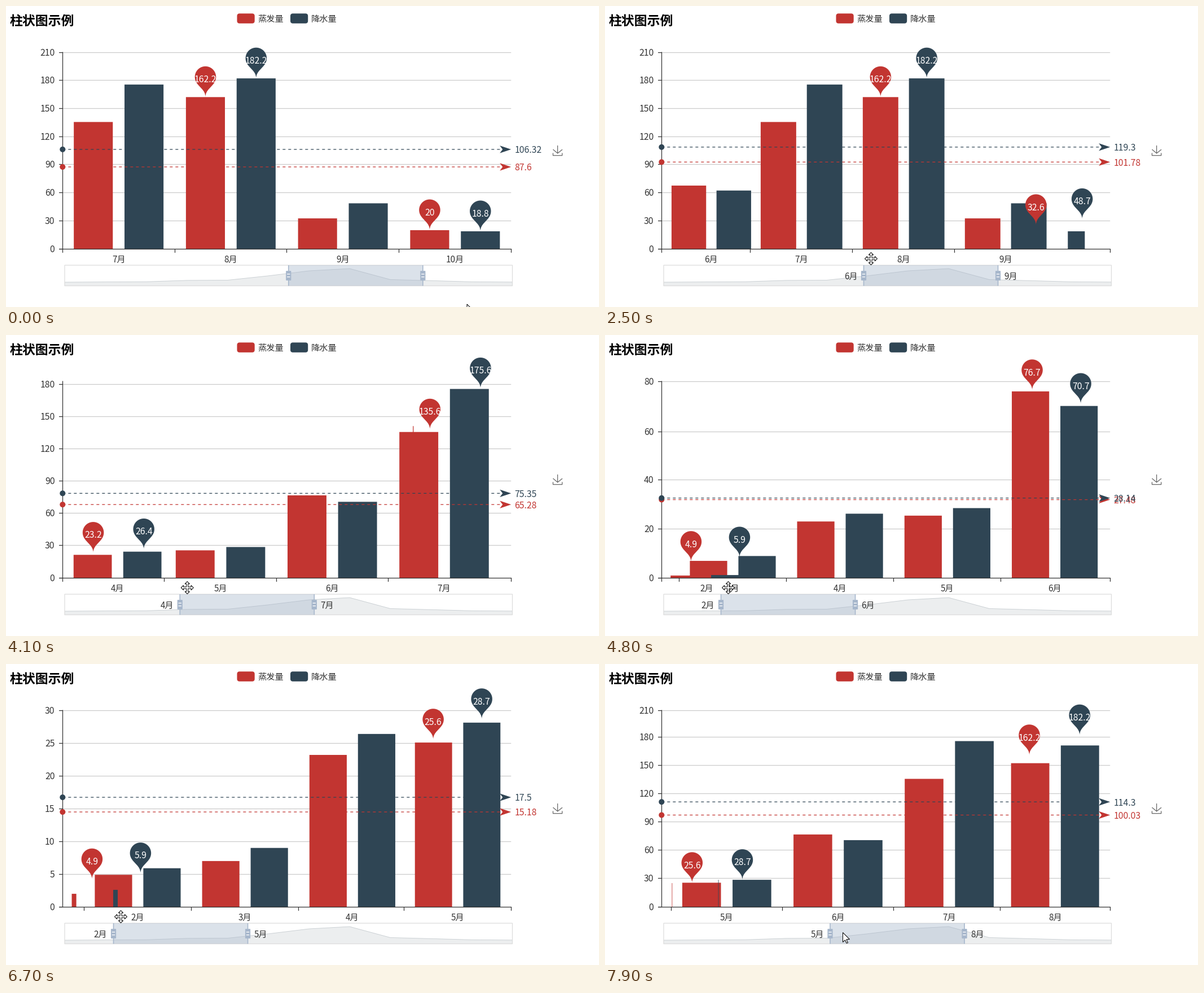
Write a matplotlib script that moves like this. It is 1051 px wide and 533 px high and loops after 8 s.

```python
import numpy as np
import matplotlib.pyplot as plt
from matplotlib.animation import FuncAnimation
from matplotlib.patches import Circle, FancyBboxPatch, PathPatch, Polygon, Rectangle
from matplotlib.path import Path

W, H, DPI = 1051, 533, 64
STEP, FRAMES = 100, 80
PT = 72 / DPI
RED, NAVY, INK, HANDLE = "#c23531", "#2f4554", "#333333", "#a7b7cc"
COLORS = (RED, NAVY)

EVAPORATION = [2, 4.9, 7, 23.2, 25.6, 76.7, 135.6, 162.2, 32.6, 20, 6.4, 3.3]
RAINFALL = [2.6, 5.9, 9, 26.4, 28.7, 70.7, 175.6, 182.2, 48.7, 18.8, 6, 2.3]
DATA = np.array([EVAPORATION, RAINFALL])

# Plot area and zoom slider
X0, X1, TOP, BASE = 100.3, 895.2, 82.1, 430.1
S0, S1, S_TOP, S_BOTTOM = 104, 897.5, 459, 495.5
SPAN = 0.3
WINDOW = SPAN * (S1 - S0)

MOVE_MS, EXIT_MS = 300, 185
LAG = 65  # the chart follows the slider this much later
HOVER, ON_HANDLE, DRAG, RELEASE = 500, 1300, 2000, 7800

# (time, left edge) where the drag changes speed
DRAG_KEYS = [(2260, 500.75), (2500, 458.5), (3860, 358), (3875, 334),
             (4500, 262.5), (4710, 212.5), (5645, 140), (5900, 111.5),
             (6240, 104), (6519, 140), (6700, 190.5), (7618, 334),
             (7672, 357), (7900, 399)]

# (time, x, y) of the pointer on its way to the slider
APPROACH = [(0, 817, 528), (300, 617, 487), (400, 617, 487),
            (1300, 505, 476.5), (1500, 509, 476.5), (1900, 509, 476.5)]

plt.rcParams["path.snap"] = False
plt.rcParams["font.family"] = ["Noto Sans CJK JP", "DejaVu Sans"]

fig = plt.figure(figsize=(W / DPI, H / DPI), dpi=DPI, facecolor="white")
ax = fig.add_axes([0, 0, 1, 1])
ax.set_xlim(0, W)
ax.set_ylim(H, 0)
ax.axis("off")


# ---------- motion ----------

def along(keys, t):
    """Position at time t on a path of (time, *position) points."""
    times, *tracks = zip(*keys)
    return [np.interp(t, times, track) for track in tracks]


def slider_left(t):
    return along(DRAG_KEYS, t)[0]


def view_at(t):
    """First and last month that the zoom window covers."""
    start = (slider_left(t) - S0) / (S1 - S0)
    return tuple(int(np.floor(p * 11 + 0.5 + 1e-9)) for p in (start, start + SPAN))


def month(i):
    return f"{i + 1}月"


def y_ticks(first, last):
    peak = DATA[:, first:last + 1].max()
    step = 30 if peak > 100 else 20 if peak > 50 else 5
    return np.arange(0, np.ceil(peak / step) + 1) * step


def extremes(s, first, last):
    part = DATA[s, first:last + 1]
    return first + int(part.argmax()), first + int(part.argmin())


def layout(first, last):
    """Resting place of every moving part."""
    ticks = y_ticks(first, last)
    unit = (BASE - TOP) / ticks[-1]
    band = (X1 - X0) / (last - first + 1)
    bar = band * 0.8 / 2.3
    place = {("y", v): [BASE - v * unit] for v in ticks}
    for i in range(first, last + 1):
        left = X0 + (i - first) * band
        place["tick", i] = [left]
        place["month", i] = [left + band / 2]
        for s in (0, 1):
            x = left + band * 0.1 + s * bar * 1.3
            place["bar", s, i] = [x, bar, DATA[s, i] * unit]
    for s in (0, 1):
        for n, i in enumerate(extremes(s, first, last)):
            x, width, height = place["bar", s, i]
            place["pin", s, n] = [x + width / 2, BASE - height]
        place["mean", s] = [BASE - DATA[s, first:last + 1].mean() * unit]
    return {k: np.array(v, float) for k, v in place.items()}


def blend(start, end, ms):
    p = 1 - (1 - min(ms / MOVE_MS, 1)) ** 3
    return {k: start[k] + (end[k] - start[k]) * p for k in end}


def entry(key, goal):
    return goal * [1, 1, 0] if key[0] == "bar" else goal


def build_stages():
    """Each new view starts from wherever the previous one had got to."""
    view = view_at(0)
    start = end = layout(*view)
    stages = [(0, view, start, end, {})]
    for t in range(FRAMES * STEP):
        new = view_at(t - LAG)
        if new == view:
            continue
        now, goal = blend(start, end, t - stages[-1][0]), layout(*new)
        gone = {k: v for k, v in now.items() if k[0] == "bar" and k not in goal}
        start = {k: now.get(k, entry(k, g)) for k, g in goal.items()}
        view, end = new, goal
        stages.append((t, view, start, end, gone))
    return stages


STAGES = build_stages()


# ---------- drawing helpers ----------

def crisp(v):
    return np.floor(v) + 0.5


def line(points, color=INK, lw=1.25, z=2, **kw):
    xs, ys = zip(*points)
    return ax.plot(xs, ys, color=color, lw=lw * PT, zorder=z,
                   solid_capstyle="butt", dash_capstyle="butt", **kw)[0]


def poly(points, color, z, **kw):
    return ax.add_patch(Polygon(points, facecolor=color, zorder=z, **kw))


def box(x, y, w, h, color, z, **kw):
    return ax.add_patch(Rectangle((x, y), w, h, facecolor=color, zorder=z, **kw))


def round_box(x, y, w, h, r, color, z):
    style = f"round,pad=0,rounding_size={r}"
    return ax.add_patch(FancyBboxPatch((x, y), w, h, boxstyle=style,
                                       facecolor=color, lw=0, zorder=z))


def text(x, y, s, color=INK, ha="center", size=15.2, z=8, **kw):
    return ax.text(x, y + size * 0.37, s, color=color, ha=ha, va="baseline",
                   fontsize=size * PT, zorder=z, **kw)


def number(x, y, value, color=INK, ha="center", z=8):
    return text(x, y, f"{float(f'{value:.2f}'):g}", color, ha, 15.8, z)


def pin_path(size=62.5):
    r = size * 0.3
    dy = r * r / (size - r)
    cy = r + dy - size
    a = np.arcsin(dy / r)
    dx = r * np.cos(a)
    arc = np.linspace(np.pi - a, 2 * np.pi + a, 60)
    points = [(r * np.cos(u), cy + r * np.sin(u)) for u in arc]
    bend_x, bend_y = dx - np.sin(a) * r * 0.6, cy + dy + np.cos(a) * r * 0.6
    neck = (0, -r * 0.7)
    points += [(bend_x, bend_y), neck, (0, 0), neck, (-bend_x, bend_y), (-dx, cy + dy)]
    codes = [Path.MOVETO] + [Path.LINETO] * 59 + [Path.CURVE4] * 6
    return np.array(points), codes


PIN, PIN_CODES = pin_path()


def draw_pin(x, y, value, color, z):
    shape = Path(PIN + [x, y], PIN_CODES)
    return [ax.add_patch(PathPatch(shape, facecolor=color, lw=0, zorder=z)),
            number(x, y - 32, value, "white", z=z + 0.1)]


def draw_mean(y, value, color, z):
    tip = X1
    arrow = [(tip, y), (tip - 20, y - 6.67), (tip - 15, y), (tip - 20, y + 6.67)]
    return [line([(X0, y), (tip - 15, y)], color, z=z, dashes=(4, 4)),
            ax.add_patch(Circle((X0, y), 5, facecolor=color, lw=0, zorder=z)),
            poly(arrow, color, z, lw=0),
            number(901.5, y + 0.5, value, color, "left", z)]


def draw_handle(x):
    parts = [line([(x, S_TOP), (x, S_BOTTOM)], HANDLE, 1.6, z=7),
             round_box(x - 4.6, 469, 9.2, 17, 1, HANDLE, 7.1)]
    for y in (474.7, 479.7):
        parts.append(line([(x - 2.7, y), (x + 2.7, y)], "white", 1.3, z=7.2))
    return parts


ARROW = np.array([(0, 0), (0, 17), (4, 13.3), (6.7, 19), (9, 18), (6.4, 12.2), (12, 12)])
ARM = np.array([(-1.5, -1.5), (-1.5, -6.8), (-4.2, -6.8), (0, -11),
                (4.2, -6.8), (1.5, -6.8)])


def arms(*quarters):
    """Arrow heads pointing up, right, down or left (0 to 3)."""
    turns = [np.round([np.cos(q * np.pi / 2), np.sin(q * np.pi / 2)]) for q in quarters]
    return np.vstack([ARM @ [[c, s], [-s, c]] for c, s in turns])


CROSS, SIDEWAYS = arms(0, 1, 2, 3), arms(1, 3)


def draw_cursor(t):
    x, y = along(APPROACH, t) if t < DRAG else (slider_left(t) + 22.5, 475.5)
    if t < HOVER or t >= RELEASE:
        shape = ARROW
    else:
        shape = (SIDEWAYS if ON_HANDLE <= t < DRAG else CROSS) - [9.5, 28]
    return [poly(shape + [x, y], "white", 20, edgecolor="black", lw=PT)]


# ---------- fixed parts ----------

def draw_static():
    text(7, 25, "柱状图示例", "black", "left", 22.9, weight="bold")
    for x, name, color in ((409.5, "蒸发量", RED), (504, "降水量", NAVY)):
        round_box(x, 13.3, 31.2, 17.5, 4.4, color, 3)
        text(x + 37, 22.3, name, ha="left")

    left, right, floor = crisp(X0), crisp(X1), crisp(BASE)
    line([(left, TOP - 0.6), (left, floor)])
    line([(left - 6.3, floor), (right + 0.6, floor)], z=4)
    line([(right, floor), (right, floor + 6.3)])

    icon = [[(4.7, 22.9), (29.3, 45.5), (54.7, 23.4)],
            [(4.6, 43.6), (4.6, 58), (53.8, 58), (53.8, 43.6)],
            [(29.2, 45.1), (29.2, 0)]]
    for stroke in icon:
        line([(969.5 + (x - 4.6) * 0.33, 247 + y * 0.305) for x, y in stroke], "#666666")

    xs = np.linspace(S0, S1, 12)
    curve = list(zip(xs, 489.3 - 0.15 * DATA[0]))
    poly(curve + [(S1, S_BOTTOM), (S0, S_BOTTOM)], NAVY, 5, alpha=0.09, lw=0)
    line(curve, NAVY, 0.9, z=5, alpha=0.22)
    box(S0, S_TOP, S1 - S0, S_BOTTOM - S_TOP, "none", 5, edgecolor="#dddddd", lw=1.25 * PT)


# ---------- moving parts ----------

def draw_axes(place):
    parts = []
    for (kind, *rest), value in place.items():
        v = crisp(value[0])
        if kind == "y":
            if rest[0] > 0:
                parts.append(line([(X0, v), (X1, v)], "#cccccc", z=1))
            parts.append(line([(X0 - 6.3, v), (X0, v)]))
            parts.append(number(86.5, v, rest[0], ha="right"))
        elif kind == "tick":
            parts.append(line([(v, BASE), (v, BASE + 6.8)]))
        elif kind == "month":
            parts.append(text(value[0], 448.2, month(rest[0])))
    return parts


def draw_bars(place, gone, ms):
    shrink = (1 - min(ms / EXIT_MS, 1)) ** 2
    bars = {k: v for k, v in place.items() if k[0] == "bar"}
    if shrink > 0:
        bars.update({k: v * [1, shrink, 1] for k, v in gone.items()})
    return [box(x, BASE - h, w, h, COLORS[k[1]], 3 + 0.1 * k[1], lw=0)
            for k, (x, w, h) in bars.items()]


def draw_slider(t, first, last):
    left = slider_left(t)
    right = left + WINDOW
    parts = [box(left, S_TOP, WINDOW, S_BOTTOM - S_TOP, HANDLE, 6, alpha=0.4, lw=0)]
    parts += draw_handle(left) + draw_handle(right)
    if t >= HOVER:
        parts.append(text(left - 11, 478, month(first), ha="right"))
        parts.append(text(right + 11, 478, month(last), ha="left"))
    return parts


moving = []


def update(n):
    for part in moving:
        part.remove()
    moving.clear()

    t = n * STEP
    t0, view, start, end, gone = [s for s in STAGES if s[0] <= t][-1]
    first, last = view
    place = blend(start, end, t - t0)

    moving.extend(draw_axes(place))
    moving.extend(draw_bars(place, gone, t - t0))
    for s, color in enumerate(COLORS):
        mean = DATA[s, first:last + 1].mean()
        moving.extend(draw_mean(place["mean", s][0], mean, color, 9 + s * 0.2))
        for k, i in enumerate(extremes(s, first, last)):
            x, y = place["pin", s, k]
            moving.extend(draw_pin(x, y, DATA[s, i], color, 10 + s * 0.5))
    moving.extend(draw_slider(t, first, last))
    moving.extend(draw_cursor(t))
    return moving


draw_static()
anim = FuncAnimation(fig, update, frames=FRAMES, interval=STEP, repeat=True,
                     init_func=lambda: [], blit=False)
plt.show()
```
